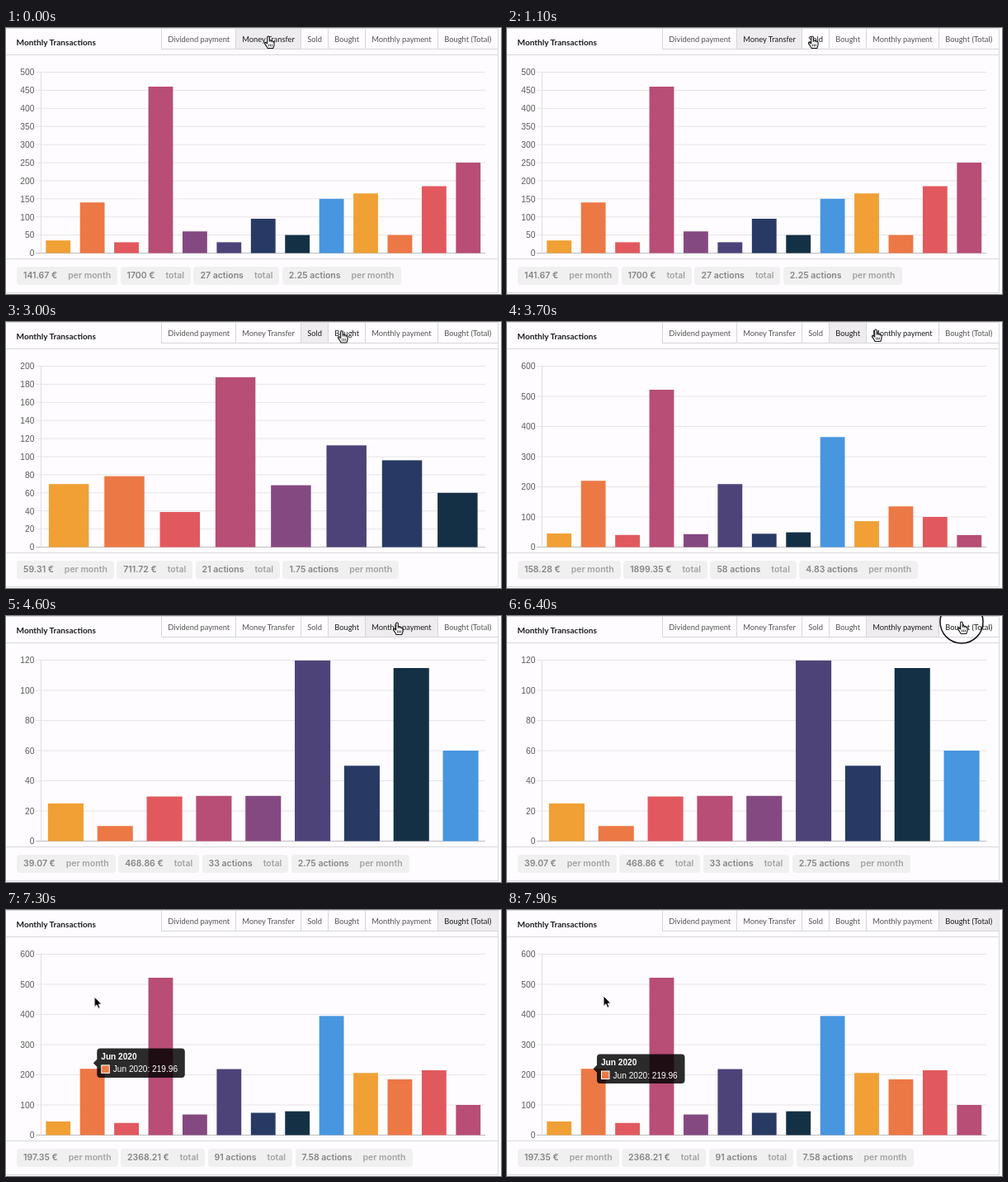
An HTML page for the animation above (8000 ms loop, 600 by 322 pixels).

```html
<!DOCTYPE html>
<html lang="en">
<head>
<meta charset="utf-8">
<title>Monthly Transactions</title>
<style>
html, body { margin: 0; width: 600px; height: 322px; overflow: hidden; background: #fefcfe; }
svg { position: absolute; left: 0; top: 0; }
.title { font: 700 10.1px Lato, sans-serif; fill: #1b1c1d; }
.tab { font: 9.35px Lato, sans-serif; fill: #555; }
.axis { font: 10.3px "Liberation Sans", Arial, sans-serif; fill: #5c5c5c; text-anchor: end; }
.tip { font: 10.15px "Liberation Sans", Arial, sans-serif; fill: #fff; }
.head { font-weight: 700; }
.stats { position: absolute; left: 13px; top: 288.5px; display: flex; gap: 3.4px; visibility: hidden; }
.pill {
  height: 22.5px; padding: 0 8px; border-radius: 4px; background: #f1f0f1;
  font: 600 10.5px/22.5px Inter, sans-serif; color: #858485; white-space: pre;
}
.pill span { margin-left: 13px; color: #a3a2a3; }
.view { visibility: hidden; }
#cursor { animation: move 8s infinite ease-in-out; }
@keyframes move {
  0% { transform: translate(318px, 10px); }
  6.25%, 23.75% { transform: translate(370px, 10px); }
  32.5%, 40% { transform: translate(407px, 10.5px); }
  51.25%, 71.25% { transform: translate(474px, 8px); }
  78.75%, 81.1% { transform: translate(551px, 7px); }
  82.5% { transform: translate(537px, 40px); animation-timing-function: ease-out; }
  85% { transform: translate(171px, 84px); animation-timing-function: linear; }
  87.5% { transform: translate(167px, 88px); animation-timing-function: linear; }
  90% { transform: translate(140px, 98px); animation-timing-function: linear; }
  92.5% { transform: translate(75px, 112px); animation-timing-function: linear; }
  93.75% { transform: translate(70px, 114px); }
  98.75%, 100% { transform: translate(117px, 104px); }
}
</style>
</head>
<body>
<svg id="stage" width="600" height="322" viewBox="0 0 600 322">
  <g fill="none" stroke="#d9d8da">
    <path d="M0 .5H596.5V320.5H0M0 32.5H596M0 279.5H596"/>
  </g>
  <text class="title" x="12.5" y="20.5">Monthly Transactions</text>
  <g id="tabs"></g>
  <g id="charts"></g>
  <g id="tooltip">
    <path id="bubble" fill="#000" fill-opacity=".83"/>
    <text id="tipHead" class="tip head" x="5" y="13.5"></text>
    <rect id="swatch" x="5.5" y="20.5" width="9.5" height="9.5" stroke="#fff"/>
    <text id="tipBody" class="tip" x="19.5" y="29"></text>
  </g>
</svg>
<svg width="600" height="322" viewBox="0 0 600 322">
  <g id="cursor">
    <circle id="ring" r="26" fill="none" stroke="#111" stroke-width="1.5"/>
    <g id="hand" stroke="#111" stroke-width="1.1" stroke-linejoin="round">
      <path fill="#fff" d="M-1.3 1.2Q-1.3 0 0 0T1.3 1.2V5Q2.7 4.2 3.3 5.4Q4.8 4.8 5.2 6.2Q7 6 7 7.6V10Q7 12 5.8 14.5H-.8Q-2.5 11.5-4.3 9.2Q-5 7.6-3.6 7.4Q-2.5 7.5-1.3 9Z"/>
      <path fill="none" stroke-width=".8" d="M1.3 5V7M3.3 5.4V7.2M5.2 6.2V7.6M.6 9.5V12.5M2.5 9.5V12.5M4.4 9.5V12.5"/>
    </g>
    <path id="arrow" fill="#000" stroke="#fff" d="M0 0V12.5L2.9 9.8L4.8 14.3L7 13.4L5.1 9H9Z"/>
  </g>
</svg>
<script>
const LOOP = 8000;
const LEFT = 42.5, RIGHT = 581, BASE = 272.5, HEIGHT = 219;
const COLORS = ['#f0a035', '#ec7845', '#e1595f', '#b84d76', '#844981', '#4e4379', '#283a64', '#143045', '#4896e0'];
const MONTHS = ['May 2020', 'Jun 2020', 'Jul 2020', 'Aug 2020', 'Sep 2020', 'Oct 2020'];
const TOTALS = [45.18, 219.96, 40.26, 521.98, 68.29, 218.94, 74, 79, 395, 206, 185, 215, 100];

const views = [
  { from: 0, to: 1180, max: 500, step: 50, stats: ['141.67 €', '1700 €', '27 actions', '2.25 actions'],
    data: [35, 140, 30, 460, 60, 30, 95, 50, 150, 165, 50, 185, 250] },
  { from: 1180, to: 3080, max: 200, step: 20, stats: ['59.31 €', '711.72 €', '21 actions', '1.75 actions'],
    data: [69.7, 78.4, 38.8, 187.8, 68.4, 112.5, 96, 60] },
  { from: 3080, to: 4580, max: 600, step: 100, stats: ['158.28 €', '1899.35 €', '58 actions', '4.83 actions'],
    data: [45.18, 219.96, 40.26, 521.98, 43, 209, 44.4, 49, 365, 86, 135, 100, 40] },
  { from: 4580, to: 6480, max: 120, step: 20, stats: ['39.07 €', '468.86 €', '33 actions', '2.75 actions'],
    data: [25, 10, 29.6, 30, 30, 119.8, 50, 114.8, 60] },
  { from: 6480, to: LOOP, max: 600, step: 100, stats: ['197.35 €', '2368.21 €', '91 actions', '7.58 actions'],
    data: TOTALS },
];

// label, left edge, hover start, view index
const tabs = [
  ['Dividend payment', 188.5], ['Money Transfer', 278.5, 0, 0], ['Sold', 357.5, 380, 1],
  ['Bought', 390.5, 2250, 2], ['Monthly payment', 435.5, 3650, 3], ['Bought (Total)', 523.5, 6050, 4],
];

const $ = id => document.getElementById(id);

function add(parent, tag, attrs, text) {
  const el = document.createElementNS('http://www.w3.org/2000/svg', tag);
  for (const key in attrs) el.setAttribute(key, attrs[key]);
  if (text !== undefined) el.textContent = text;
  return parent.appendChild(el);
}

// Hard changes of one property: list of [time, value]
function steps(el, prop, list) {
  const frames = [...list, [LOOP, list[list.length - 1][1]]]
    .map(([t, value]) => ({ [prop]: value, offset: t / LOOP, easing: 'step-end' }));
  el.animate(frames, { duration: LOOP, iterations: Infinity });
}

function showBetween(el, from, to) {
  const list = [[0, from ? 'hidden' : 'visible']];
  if (from) list.push([from, 'visible']);
  if (to < LOOP) list.push([to, 'hidden']);
  steps(el, 'visibility', list);
}

tabs.forEach(([label, x, hover, index], i) => {
  const next = i < 5 ? tabs[i + 1][1] : 596.5;
  const bg = add($('tabs'), 'rect', { x, y: 1, width: next - x, height: 24.5, fill: '#eeecee', opacity: 0 });
  add($('tabs'), 'path', { d: `M${x} 1V25.5H${next}`, fill: 'none', stroke: '#d6d5d7' });
  const text = add($('tabs'), 'text', { class: 'tab', x: x + 7.7, y: 17 }, label);
  if (index === undefined) return;
  const { from, to } = views[index];
  const shade = [[0, from ? 0 : 1]], ink = [[0, hover ? '#555' : '#1b1c1d']];
  if (from) shade.push([from, 1]);
  if (hover) ink.push([hover, '#1b1c1d']);
  if (to < LOOP) {
    shade.push([to, .5], [to + 100, 0]);
    ink.push([to + 100, '#555']);
  }
  steps(bg, 'opacity', shade);
  steps(text, 'fill', ink);
});

for (const { from, to, max, step, stats, data } of views) {
  const g = add($('charts'), 'g', { class: 'view' });
  for (let v = 0; v <= max; v += step) {
    const y = BASE - HEIGHT * v / max;
    add(g, 'path', { d: `M36 ${y}H${RIGHT}`, stroke: v ? '#e6e4e6' : '#bfbdbf' });
    add(g, 'text', { class: 'axis', x: 34.5, y: y + 3.8 }, v);
  }
  add(g, 'path', { d: `M${LEFT} ${BASE - HEIGHT}V${BASE}`, stroke: '#dfdddf' });
  const slot = (RIGHT - LEFT) / data.length;
  data.forEach((v, i) => {
    const h = HEIGHT * v / max;
    add(g, 'rect', { x: LEFT + slot * (i + .14), y: BASE - h, width: slot * .72, height: h, fill: COLORS[i % 9] });
  });

  const row = document.createElement('div');
  row.className = 'stats';
  stats.forEach((value, i) => {
    const pill = document.createElement('div');
    const detail = document.createElement('span');
    pill.className = 'pill';
    detail.textContent = i % 3 ? 'total' : 'per month';
    pill.append(value, detail);
    row.append(pill);
  });
  document.body.insertBefore(row, $('cursor').ownerSVGElement);
  showBetween(g, from, to);
  showBetween(row, from, to);
}

showBetween($('hand'), 0, 6540);
showBetween($('arrow'), 6540, LOOP);
steps($('ring'), 'visibility', [[0, 'hidden'], [4480, 'visible'], [4580, 'hidden'], [6380, 'visible'], [6480, 'hidden']]);

// Tooltip: start time and bar it heads for
const TIP_H = 35.5, CARET = 4.5;
const stops = [[6560, 5], [6585, 4], [6675, 3], [7150, 2], [7220, 1], [7330, 0], [7580, 1]];

function target(i) {
  const x = LEFT + (RIGHT - LEFT) / 13 * (i + .5);
  const y = BASE - HEIGHT * TOTALS[i] / 600;
  const w = i === 0 || i === 4 ? 101 : 106.5;
  if (y < 100) return { side: 'top', w, x: x - w / 2, y: y + CARET };
  if (y > 243) return { side: 'bottom', w, x: x - w / 2, y: y - CARET - TIP_H };
  return { side: 'left', w, x: x + CARET, y: y - TIP_H / 2 };
}

function place(k, t) {
  const to = target(stops[k][1]);
  if (!k) return to;
  const from = place(k - 1, stops[k][0]);
  const rest = (1 - Math.min(1, (t - stops[k][0]) / 400)) ** 4;
  return { ...to, x: to.x + (from.x - to.x) * rest, y: to.y + (from.y - to.y) * rest };
}

function bubble({ side, w }) {
  const c = w / 2, m = TIP_H / 2, h = TIP_H;
  const box = `M4 0H${w - 4}Q${w} 0 ${w} 4V${h - 4}Q${w} ${h} ${w - 4} ${h}H4Q0 ${h} 0 ${h - 4}V4Q0 0 4 0Z`;
  const caret = {
    top: `M${c - 4.5} 0L${c} ${-CARET}L${c + 4.5} 0Z`,
    bottom: `M${c - 4.5} ${h}L${c} ${h + CARET}L${c + 4.5} ${h}Z`,
    left: `M0 ${m - 4.5}L${-CARET} ${m}L0 ${m + 4.5}Z`,
  };
  return box + caret[side];
}

const start = performance.now();

function draw() {
  const t = (performance.now() - start) % LOOP;
  const k = stops.findLastIndex(([from]) => t >= from);
  $('tooltip').style.visibility = k < 0 ? 'hidden' : 'visible';
  if (k >= 0) {
    const i = stops[k][1], pose = place(k, t);
    $('tooltip').setAttribute('transform', `translate(${pose.x} ${pose.y})`);
    $('bubble').setAttribute('d', bubble(pose));
    $('swatch').setAttribute('fill', COLORS[i]);
    $('tipHead').textContent = MONTHS[i];
    $('tipBody').textContent = `${MONTHS[i]}: ${TOTALS[i]}`;
  }
  requestAnimationFrame(draw);
}
draw();
</script>
</body>
</html>
```
